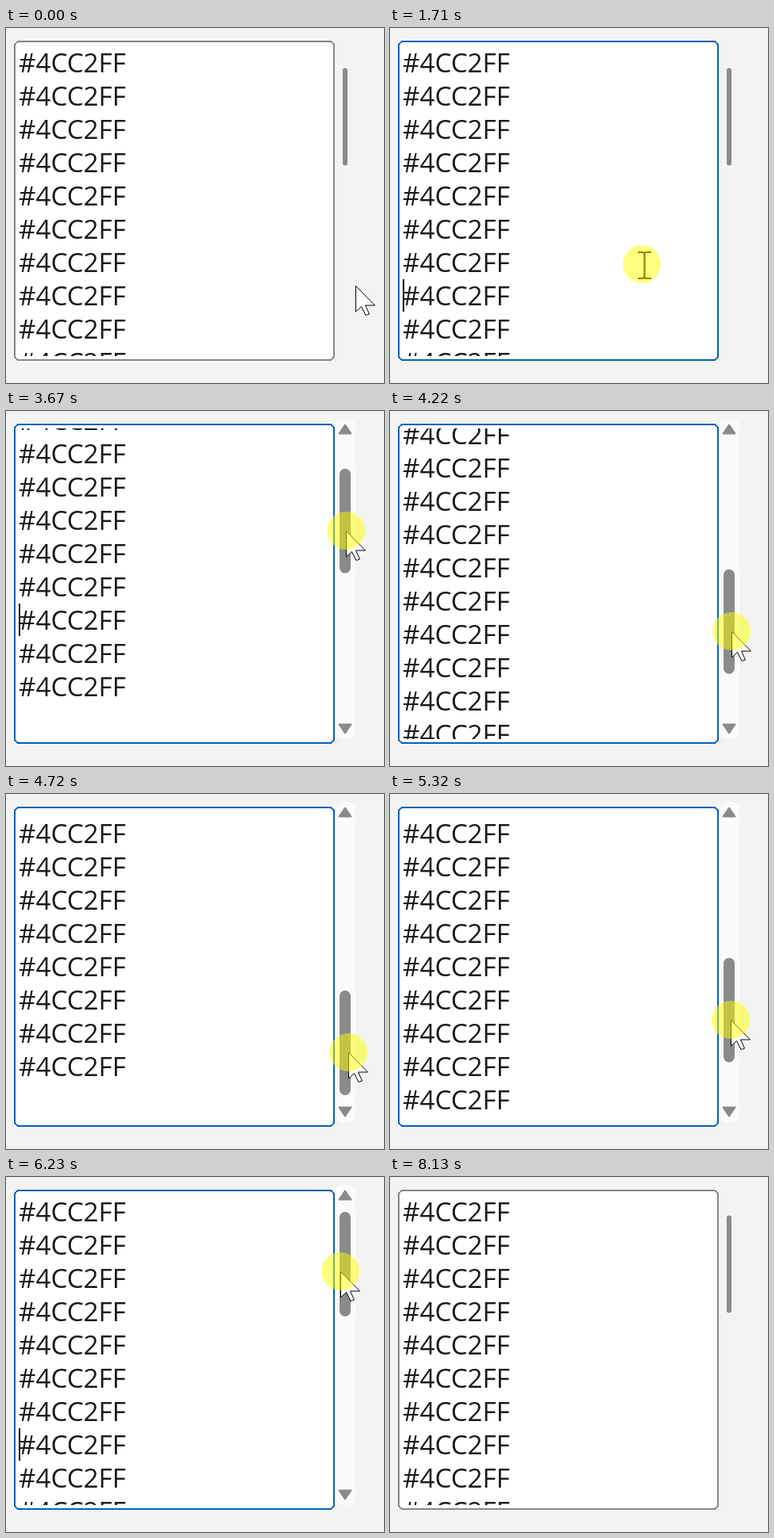
These frames come from a looping animation (476 by 448 pixels, 9.24 s). An HTML page:

```html
<!DOCTYPE html>
<html lang="en">
<head>
<meta charset="utf-8">
<title>Scrolling text box</title>
<style>
  html, body { margin: 0; width: 100%; height: 100%; overflow: hidden; background: #f3f3f2; }
  svg { display: block; }
  text { font: 33.2px "Open Sans", "Noto Sans", sans-serif; fill: #1a1a1a; }
</style>
</head>
<body>
<svg width="476" height="448" viewBox="0 0 476 448">
  <clipPath id="view"><rect x="12" y="22" width="400" height="392"/></clipPath>
  <rect id="box" x="11" y="17" width="402" height="402" rx="6" fill="#fff" stroke-width="2" shape-rendering="crispEdges"/>
  <g clip-path="url(#view)">
    <g id="lines">
      <rect id="caret" x="16" y="317" width="2" height="41" fill="#000"/>
    </g>
  </g>
  <g id="track">
    <rect x="414" y="10" width="26" height="404" rx="9" fill="#fafafa"/>
    <path d="M427 17.5L434.5 28.5H419.5ZM427 406.5L434.5 395.5H419.5Z" fill="#8a8a8a" stroke="#8a8a8a" stroke-width="2" stroke-linejoin="round"/>
  </g>
  <rect id="thumb" fill="#8a8a8a"/>
  <path id="arrow" d="M.5 .5V33L7.5 26.5L13 37.5L17.5 36L12.5 25H24.5Z" fill="#fff" stroke="#000"/>
  <path id="beam" d="M-5 -15H1Q3.5 -15 3.5 -12Q3.5 -15 6 -15H12M3.5 -13V16M-5 18H1Q3.5 18 3.5 15Q3.5 18 6 18H12" fill="none" stroke="#111" stroke-width="2.2"/>
  <circle id="press" r="24" fill="#ff0" fill-opacity=".5"/>
</svg>
<script>
const LOOP = 9240, ROWS = 23, PITCH = 42, RATIO = 3.06;
const CLICK = 1710, CLICK_END = 1810, GRAB = 3520, RELEASE = 6630, BLUR = 8130, GONE = 7330;
const TOP = 44, GRIP = 78, TRAVEL = 204;

// Pointer legs; a lower bias makes a leg quicker at the start
const legs = [
  { from: 800, to: 1250, x: 317, y: 298 },
  { from: 2320, to: 3270, x: 428, y: 124 },
  { from: GRAB, to: 4720, x: 431, y: 326, bias: .71 },
  { from: 4970, to: 6190, x: 421, y: 119 },
  { from: 6420, to: 6470, x: 422, y: 113 },
  { from: 6770, to: 6870, x: 447, y: 95 },
  { from: 6870, to: GONE, x: 300, y: -40 }
];

const $ = id => document.getElementById(id);
const mix = (a, b, k) => a + (b - a) * k;
const clamp = (v, lo = 0, hi = 1) => Math.min(hi, Math.max(lo, v));
const ramp = (t, from, to) => clamp((t - from) / (to - from));
const smooth = k => k * k * (3 - 2 * k);
const within = (t, from, to) => t >= from && t < to;
const show = (el, on) => el.setAttribute("visibility", on ? "visible" : "hidden");
const move = (el, x, y) => el.setAttribute("transform", `translate(${x} ${y})`);
const set = (el, attrs) => Object.entries(attrs).forEach(([k, v]) => el.setAttribute(k, v));

function pointer(t) {
  return legs.reduce((p, { from, to, x, y, bias = 1 }) => {
    const k = smooth(ramp(t, from, to) ** bias);
    return { x: mix(p.x, x, k), y: mix(p.y, y, k) };
  }, { x: 440, y: 325 });
}

// The bar widens from one time and narrows from another
const hover = (t, on, off) => ramp(t, on, on + 150) - ramp(t, off, off + 150);

const dragAt = t => within(t, GRAB, RELEASE) ? clamp(pointer(t).y - GRIP - TOP, 0, TRAVEL) : 0;

// The caret is solid while dragging and blinks otherwise
function caretOn(t) {
  if (!within(t, CLICK, BLUR)) return false;
  const since = t < GRAB ? t - CLICK : Math.max(0, t - RELEASE);
  return since % 1060 < 610;
}

const rows = Array.from({ length: ROWS }, (_, i) => {
  const row = document.createElementNS("http://www.w3.org/2000/svg", "text");
  set(row, { x: 16, y: 56 + i * PITCH });
  row.textContent = "#4CC2FF";
  $("lines").insertBefore(row, $("caret"));
  return row;
});

function draw(t) {
  // The screen refreshes in 50 ms steps
  const step = Math.floor((t - 20) / 50) * 50 + 20;
  const spot = pointer(step), x = Math.round(spot.x), y = Math.round(spot.y);
  const wide = hover(step, 770, 1070) + hover(step, 2870, 7370);

  // Text trails the thumb at first, before new rows are painted
  const early = within(t, GRAB, GRAB + 200);
  move($("lines"), 0, -Math.round(dragAt(early ? step - 20 : step) * RATIO));
  rows.forEach((row, i) => show(row, !early || i < 10));
  show($("caret"), caretOn(t));
  set($("box"), { stroke: within(t, CLICK, BLUR) ? "#0062b8" : "#868686" });

  const width = mix(6, 14, wide);
  set($("track"), { opacity: wide });
  set($("thumb"), {
    x: 427 - width / 2,
    y: mix(t < RELEASE ? 50.5 : 48.5, TOP, wide) + dragAt(step),
    width,
    height: mix(123, 132, wide),
    rx: width / 2
  });

  const inText = within(x, 11, 413) && within(y, 17, 420);
  show($("arrow"), t < GONE && !inText);
  show($("beam"), t < GONE && inText);
  show($("press"), within(t, CLICK, CLICK_END) || within(t, GRAB, RELEASE));
  for (const id of ["arrow", "beam", "press"]) move($(id), x, y);
}

const start = performance.now();
function tick() {
  draw((performance.now() - start) % LOOP);
  requestAnimationFrame(tick);
}
tick();
</script>
</body>
</html>
```
